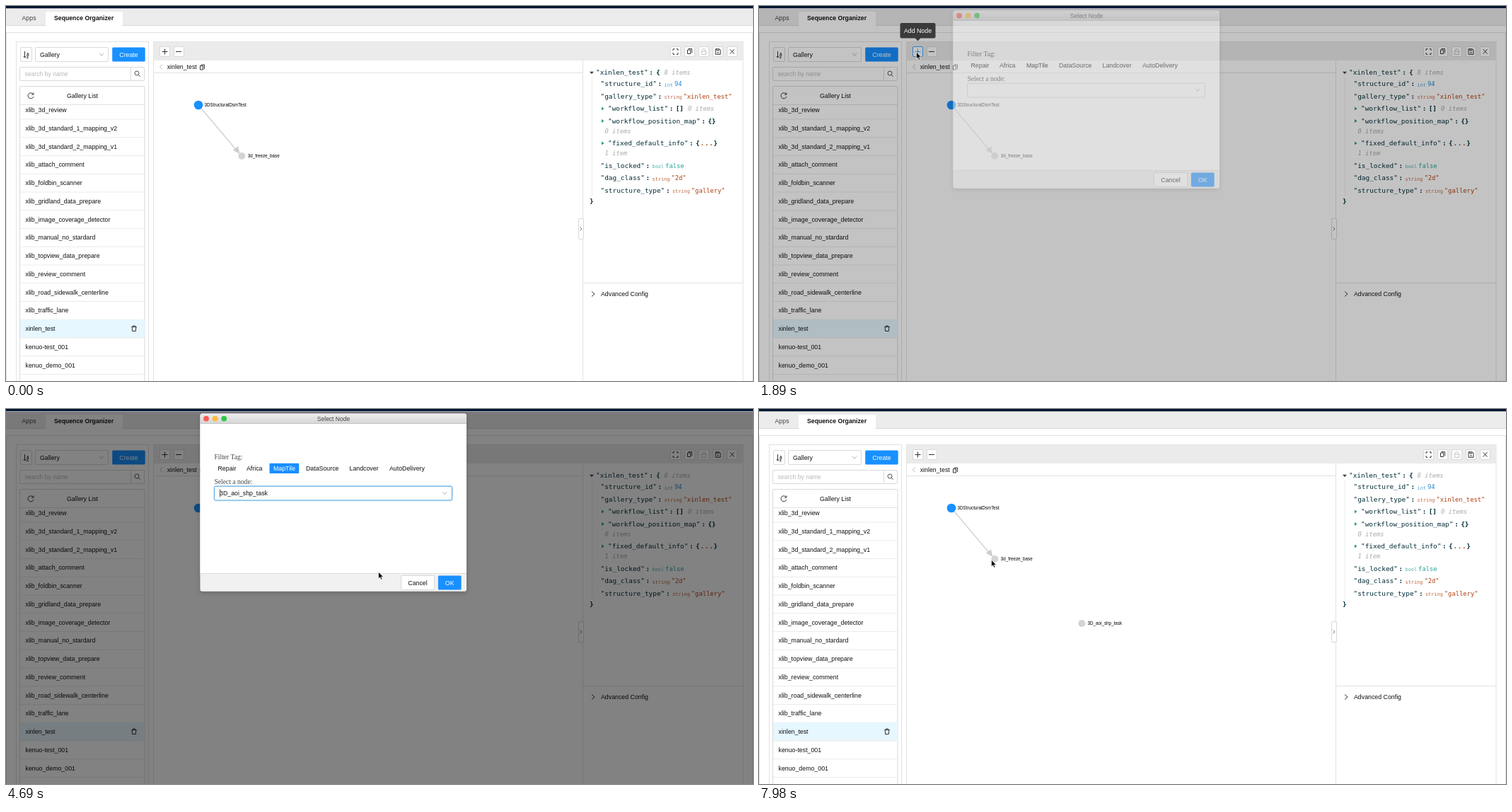
Animation of 1056 by 530 pixels, one loop 8 s. Source, as an HTML page:

```html
<!DOCTYPE html>
<html lang="en">
<head>
<meta charset="utf-8">
<title>Sequence Organizer</title>
<style>
html, body { margin: 0; width: 100%; height: 100%; overflow: hidden; background: #fff; }
svg { display: block; width: 1056px; height: 530px; }
text { font: 8.8px "Liberation Sans", Arial, sans-serif; fill: #111; white-space: pre; }
.bold { font-weight: bold; font-size: 8.7px; }
.label { font-size: 6.28px; fill: #000; }
.serif { font: 9.6px "Liberation Serif", Times, serif; fill: #444; }
.key { font: 9.43px "DejaVu Sans Mono", monospace; fill: #002b36; }
.sign { font: bold 9.43px "DejaVu Sans Mono", monospace; fill: #002b36; }
.value { font: 8.8px "DejaVu Sans Mono", monospace; }
.type { font: 6.91px "DejaVu Sans Mono", monospace; }
.items { font: italic 8.8px "DejaVu Sans Mono", monospace; fill: #aaa; }
.icon { fill: none; stroke: #333; stroke-width: 1; }
</style>
</head>
<body>
<svg id="stage" viewBox="0 0 1056 530"></svg>
<script>
const BLUE = '#1890ff', LINE = '#e2e2e2', EDGE = '#d9d9d9';
const LOOP = 8000, STEP = 70;

const text = (x, y, s, attrs = '') => `<text x="${x}" y="${y + 3.1}" ${attrs}>${s}</text>`;
const rect = (x, y, w, h, fill, attrs = '') =>
  `<rect x="${x}" y="${y}" width="${w}" height="${h}" fill="${fill}" ${attrs}/>`;
const box = (x, y, w, h, attrs = '') => rect(x, y, w, h, '#fff', `stroke="${EDGE}" rx="1.5" ${attrs}`);
const path = (d, attrs = 'class="icon"') => `<path d="${d}" ${attrs}/>`;
const line = (d, color = LINE) => path(d, `fill="none" stroke="${color}"`);
const dot = (x, y, r, fill, attrs = '') => `<circle cx="${x}" cy="${y}" r="${r}" fill="${fill}" ${attrs}/>`;
const group = (id, body, attrs = '') => `<g id="${id}" ${attrs}>${body}</g>`;
const chevron = (x, y) => path(`M${x - 3} ${y - 2}l3 4l3-4`, 'fill="none" stroke="#bbb"');
const copyIcon = (x, y) => path(`M${x - 2} ${y - 3.5}h5v6M${x - 3} ${y - 2}h4v5.5h-4Z`);

function header() {
  return rect(0, 3, 1056, 24.5, '#ececec') + rect(0, 0, 1056, 3.3, '#001532') +
    line('M0 27.5H1056', EDGE) + rect(56, 8, 109, 20, '#fff', 'rx="1.5"') +
    text(22.5, 17, 'Apps', 'style="fill:#444"') +
    text(68, 17, 'Sequence Organizer', 'class="bold"') +
    rect(.5, 37.5, 1055, 520, '#fff', `stroke="${LINE}"`);
}

function sidebar() {
  const names = ['xlib_3d_review', 'xlib_3d_standard_1_mapping_v2', 'xlib_3d_standard_2_mapping_v1',
    'xlib_attach_comment', 'xlib_foldbin_scanner', 'xlib_gridland_data_prepare',
    'xlib_image_coverage_detector', 'xlib_manual_no_stardard', 'xlib_topview_data_prepare',
    'xlib_review_comment', 'xlib_road_sidewalk_centerline', 'xlib_traffic_lane',
    'xinlen_test', 'kenuo-test_001', 'kenuo_demo_001'];
  const rows = names.map((name, i) => {
    const y = 147 + i * 25.75;
    return (i === 12 ? rect(20, y - 12.9, 176, 25.8, '#e6f7ff') : '') +
      line(`M20 ${y + 13}H196`, '#ebebeb') + text(27.5, y, name);
  }).join('');
  return rect(14.5, 50.5, 187, 500, '#fff', `stroke="${LINE}"`) +
    box(20.5, 58.5, 16, 20) +
    path('M26.5 64v9m-2-2l2 2l2-2') + text(29, 66.5, 'A', 'style="font-size:5px;font-weight:bold"') +
    text(29, 71, 'Z', 'style="font-size:5px;font-weight:bold"') +
    box(41.5, 58.5, 103, 20) + text(48, 68.5, 'Gallery') + chevron(135, 68.5) +
    rect(150.2, 58.4, 46.5, 20.2, BLUE, 'rx="1.5"') + text(173.5, 68.5, 'Create', 'text-anchor="middle" style="fill:#fff"') +
    box(19.5, 86.5, 176, 19) + line('M176.5 86.5V105.5', EDGE) +
    text(26.5, 96, 'search by name', 'style="fill:#b8b8b8;font-size:8.6px"') +
    dot(185, 95, 3, 'none', 'stroke="#555"') + path('M187.2 97.2l2.6 2.6', 'stroke="#555"') +
    box(19.5, 113.5, 176.5, 440) + rows + line('M20 139.5H196') +
    path('M38.4 124.6a4 4 0 1 0 .5 3.4M38.9 122.5v2.7h-2.7') +
    text(108, 127, 'Gallery List', 'text-anchor="middle"') +
    path('M177.3 453.5h7.4M179.5 453.5v-1.5h3v1.5M178.2 453.5l.4 6h4.8l.4-6');
}

function toolbar() {
  const buttons = [939.5, 959.5, 979.5, 999.5, 1019.5].map(x => box(x, 57.5, 14, 14)).join('');
  return rect(208.5, 50.5, 833.5, 500, '#fff', `stroke="${LINE}"`) + rect(208.5, 50.5, 833.5, 26.5, '#ebebeb') +
    line('M209 94.5H815.5V77V530M816 391.5H1042') +
    box(217.5, 57.5, 14, 14, 'id="plusBox"') + path('M220.5 64.5h8M224.5 60.5v8', 'id="plusSign" stroke="#333"') +
    box(237.5, 57.5, 14, 14) + path('M240 64.5h8') + buttons +
    path('M943 63v-2.3h2.3M947.7 60.7h2.3v2.3M950 66v2.3h-2.3M945.3 68.3h-2.3v-2.3') +
    copyIcon(966.5, 64) +
    path('M983.2 64h6.6v4.3h-6.6ZM984.5 64v-1.5a2 2 0 0 1 4 0v1.5', 'fill="none" stroke="#c0c0c0"') +
    path('M1003 60.7h5.4l1.6 1.6v6h-7ZM1004.8 61v2h3v-2M1005 66h3') + path('M1023.7 61.2l5.8 6.4m0-6.4l-5.8 6.4') +
    path('M221 82.5l-3.5 3.5l3.5 3.5', 'fill="none" stroke="#bbb"') +
    text(227.7, 86, 'xinlen_test') + copyIcon(277.5, 86.5) +
    box(809.5, 300.5, 7, 29) + path('M811.5 312.5l2.5 2.5l-2.5 2.5', 'fill="none" stroke="#777"') +
    path('M828 403.5l4 3.5l-4 3.5') + text(841, 406.5, 'Advanced Config');
}

function inspector() {
  const tints = { int: '#268bd2', string: '#b0400f', bool: '#2aa198' };
  const keyEnd = (x, key) => x + (key.length + 2) * 5.68;
  const keyText = (x, y, key) => text(x, y, `"${key}"`, 'class="key"') + text(keyEnd(x, key) + 1.5, y, ':', 'class="sign"');
  const leaf = (y, key, type, value) => {
    const x = keyEnd(840.5, key) + 10.5;
    return keyText(840.5, y, key) + text(x, y + .5, type, `class="type" style="fill:${tints[type]};opacity:.8"`) +
      text(x + type.length * 4.16 + 2, y, value, `class="value" style="fill:${tints[type]}"`);
  };
  const branch = (y, key, sign, attrs = '') => path(`M842 ${y - 2.5}l3.5 2.5l-3.5 2.5Z`, 'fill="#2a9d78"') +
    keyText(851, y, key) + text(keyEnd(851, key) + 10.5, y, sign, `class="sign" ${attrs}`);
  const items = (x, y, s) => text(x, y, s, 'class="items"');
  return line('M828.5 101V269', '#ededed') + path('M825 92.7h6l-3 3.6Z', 'fill="#444"') +
    keyText(834, 94, 'xinlen_test') + text(919, 94, '{', 'class="sign"') + items(930.5, 94, '8 items') +
    leaf(110, 'structure_id', 'int', '94') + leaf(127.5, 'gallery_type', 'string', '"xinlen_test"') +
    branch(145, 'workflow_list', '[]') + items(964, 145, '0 items') +
    branch(162.5, 'workflow_position_map', '{}') + items(846.5, 176.5, '0 items') +
    branch(194, 'fixed_default_info', '{<tspan fill="#b0400f">...</tspan>}', 'letter-spacing=".6"') +
    items(846.5, 208, '1 item') +
    leaf(225.5, 'is_locked', 'bool', 'false') + leaf(243, 'dag_class', 'string', '"2d"') +
    leaf(260.5, 'structure_type', 'string', '"gallery"') + text(825, 276, '}', 'class="sign"');
}

function graph() {
  const grey = 'fill-opacity=".85"';
  return path('M272 140L326 204', 'stroke="#d3d3d3" stroke-width="1.5"') +
    path('M330.5 209L320.8 203.8L328 198.2Z', 'fill="#cdcdcd"') +
    dot(272, 140, 6.3, BLUE) + text(280.5, 139.3, '3DStructuralDsmTest', 'class="label" dy="-.8"') +
    dot(333.3, 212, 5, '#ccc', grey) + text(341.7, 211.5, '3d_freeze_base', 'class="label" dy="-.8"') +
    group('newNode', dot(0, 0, 5.1, '#ccc', grey) + text(8.3, -.4, '3D_aoi_shp_task', 'class="label" dy="-.8"'));
}

function modal() {
  const tags = { Repair: 299.5, Africa: 340, MapTile: 378, DataSource: 424, Landcover: 485.5, AutoDelivery: 542 };
  const options = ['3D_aoi_base', '3D_aoi_check', '3D_aoi_clip', '3D_aoi_grid', '3D_aoi_merge',
    '3D_aoi_shp_task', '3D_aoi_split', '3D_aoi_tile'];
  const lights = ['#fc5b57', '#fdbc40', '#33c748'].map((c, i) => dot(283 + i * 12.6, 13.6, 3.9, c)).join('');
  return rect(274.5, 6.5, 376.5, 251.2, '#f1f1f1', 'rx="3" filter="url(#shadow)"') +
    rect(274.5, 20, 376.5, 212.5, '#fff') +
    path('M274.5 20.5V9.5a3 3 0 0 1 3-3H648a3 3 0 0 1 3 3V20.5Z', 'fill="url(#bar)"') + line('M274.5 20.5H651', '#c4c4c4') +
    lights + text(463, 13.6, 'Select Node', 'text-anchor="middle" style="font-size:8.5px;fill:#444"') +
    text(294.5, 68, 'Filter Tag:', 'class="serif"') + text(294.5, 102.5, 'Select a node:', 'class="serif"') +
    rect(372.5, 76.7, 41.7, 14.3, BLUE, 'id="tagFill" rx="1"') +
    Object.entries(tags).map(([name, x]) => text(x, 84, name, `id="tag${name}"`)).join('') +
    box(294.5, 109.2, 336, 19.8, 'id="select"') + chevron(620, 119) +
    text(302, 119, '3D_aoi_shp_task', 'id="chosen"') + path('M302.5 113.5v11', 'id="caret" stroke="#222" stroke-width=".8"') +
    line('M274.5 232.5H651', '#dedede') +
    box(558.5, 235.5, 47, 20) + text(582, 245.6, 'Cancel', 'text-anchor="middle"') +
    rect(610.9, 235.4, 32.7, 20.2, BLUE, 'id="ok" rx="1.5"') + text(627.2, 245.6, 'OK', 'text-anchor="middle" style="fill:#fff"') +
    group('dropdown', rect(294.5, 131.5, 336, 165, '#fff', 'rx="2" filter="url(#shadow)"') +
      rect(294.5, 234.6, 336, 20.1, '#e6f7ff', 'id="optionFill"') +
      options.map((name, i) => text(302, 144 + i * 20.1, name)).join(''));
}

const tooltip = group('tooltip', rect(199.5, 24, 50, 21.5, '#3b3b3b', 'rx="2"') + path('M220.5 45h8l-4 4.5Z', 'fill="#3b3b3b"') +
  text(224.5, 34.8, 'Add Node', 'text-anchor="middle" style="fill:#fff"'));
const cursors = group('arrow', path('M-.5-.8V8.8L1.7 6.8L3.3 10.2L4.9 9.5L3.4 6.2H6.4Z', 'fill="#000" stroke="#fff" stroke-width=".7"')) +
  group('hand', path('M-1.2 6V.8a1.1 1.1 0 0 1 2.2 0V4.2l1.5.2l1.6.5l1.6.8V8L4.6 11.4H-.6L-3.2 7.4l-.2-1.6l1.1-.1Z',
    'fill="#fff" stroke="#000" stroke-width=".9" stroke-linejoin="round"') + path('M1 8v2M2.8 8v2', 'stroke="#000" stroke-width=".5"'));

const stage = document.getElementById('stage');
stage.innerHTML = `<defs><linearGradient id="bar" x2="0" y2="1"><stop stop-color="#ededed"/><stop offset="1" stop-color="#d6d6d6"/></linearGradient>
  <filter id="shadow" x="-10%" y="-10%" width="120%" height="125%"><feDropShadow dx="0" dy="2" stdDeviation="3" flood-opacity=".2"/></filter></defs>` +
  header() + sidebar() + toolbar() + inspector() + graph() +
  rect(0, 4, 1056, 526, '#000', 'id="mask"') + group('modal', modal()) + tooltip + cursors;

const part = {};
stage.querySelectorAll('[id]').forEach(el => part[el.id] = el);

const clamp = v => Math.min(1, Math.max(0, v));
const ease = (t, from, to) => { const u = clamp((t - from) / (to - from)); return u * u * (3 - 2 * u); };
const within = (t, from, to) => t >= from && t < to;
const show = (name, opacity) => part[name].setAttribute('opacity', +opacity);
const move = (name, [x, y]) => part[name].setAttribute('transform', `translate(${x} ${y})`);
const paint = (name, attr, value) => part[name].setAttribute(attr, value);

// time, x, y
const route = [[350, 495, 459], [1120, 226, 68], [1260, 223, 66], [2030, 223, 66], [2380, 438, 119],
  [2660, 399, 85], [3220, 400, 86], [3570, 372, 117], [3710, 372, 117], [4060, 368, 234], [4200, 370, 238],
  [4340, 370, 238], [4690, 527, 231], [4970, 626, 244], [5320, 626, 244], [5600, 635, 249], [5880, 520, 259],
  [6580, 272, 140], [6790, 272, 140], [7140, 456, 303], [7280, 497, 306], [7420, 476, 290],
  [7560, 486, 302], [7980, 329, 214]];

function pointer(t) {
  const next = route.findIndex(k => k[0] > t);
  if (next === 0) return route[0].slice(1);
  if (next < 0) return route[route.length - 1].slice(1);
  const [t0, x0, y0] = route[next - 1], [t1, x1, y1] = route[next];
  const u = ease(t, t0, t1);
  return [x0 + (x1 - x0) * u, y0 + (y1 - y0) * u];
}

function draw(t) {
  const at = pointer(t);
  const hand = within(t, 2600, 3360) || within(t, 3500, 4480) || within(t, 4900, 5390);
  move('arrow', at);
  move('hand', at);
  show('arrow', t >= 350 && !hand);
  show('hand', hand);

  const open = ease(t, 1790, 1995) * (1 - ease(t, 5300, 5510));
  show('mask', open * .49);
  show('modal', open);
  show('tooltip', ease(t, 1240, 1440) * (1 - ease(t, 2080, 2300)));

  const plusLit = within(t, 1190, 2170) || within(t, 5950, 6790);
  paint('plusBox', 'stroke', plusLit ? '#40a9ff' : EDGE);
  paint('plusSign', 'stroke', plusLit ? '#40a9ff' : '#333');

  const picked = t >= 2940, hover = ease(t, 2590, 2870);
  show('tagFill', picked);
  part.tagMapTile.style.fill = picked ? '#fff' : `rgb(${24 * hover},${144 * hover},${255 * hover})`;

  const focused = within(t, 3640, 5600);
  paint('select', 'stroke', focused ? '#4fa6d8' : EDGE);
  part.select.style.filter = focused ? 'drop-shadow(0 0 .8px #1890ff55)' : '';
  show('caret', focused && (t - 3640) % 1000 < 500);
  show('chosen', t >= 4340);
  show('dropdown', ease(t, 3640, 3840) * (1 - ease(t, 4330, 4500)));
  paint('optionFill', 'y', 133.9 + 20.1 * Math.max(0, Math.min(7, Math.floor((at[1] - 132) / 20.1))));
  paint('ok', 'fill', within(t, 4900, 5320) ? '#40a9ff' : BLUE);

  show('newNode', t >= 5320);
  move('newNode', t < 6790 ? [272, 140] : t < 7140 ? at : [456.3, 303]);
}

function frame(now) {
  draw(Math.floor((now % LOOP) / STEP) * STEP);
  requestAnimationFrame(frame);
}
draw(0);
requestAnimationFrame(frame);
</script>
</body>
</html>
```
